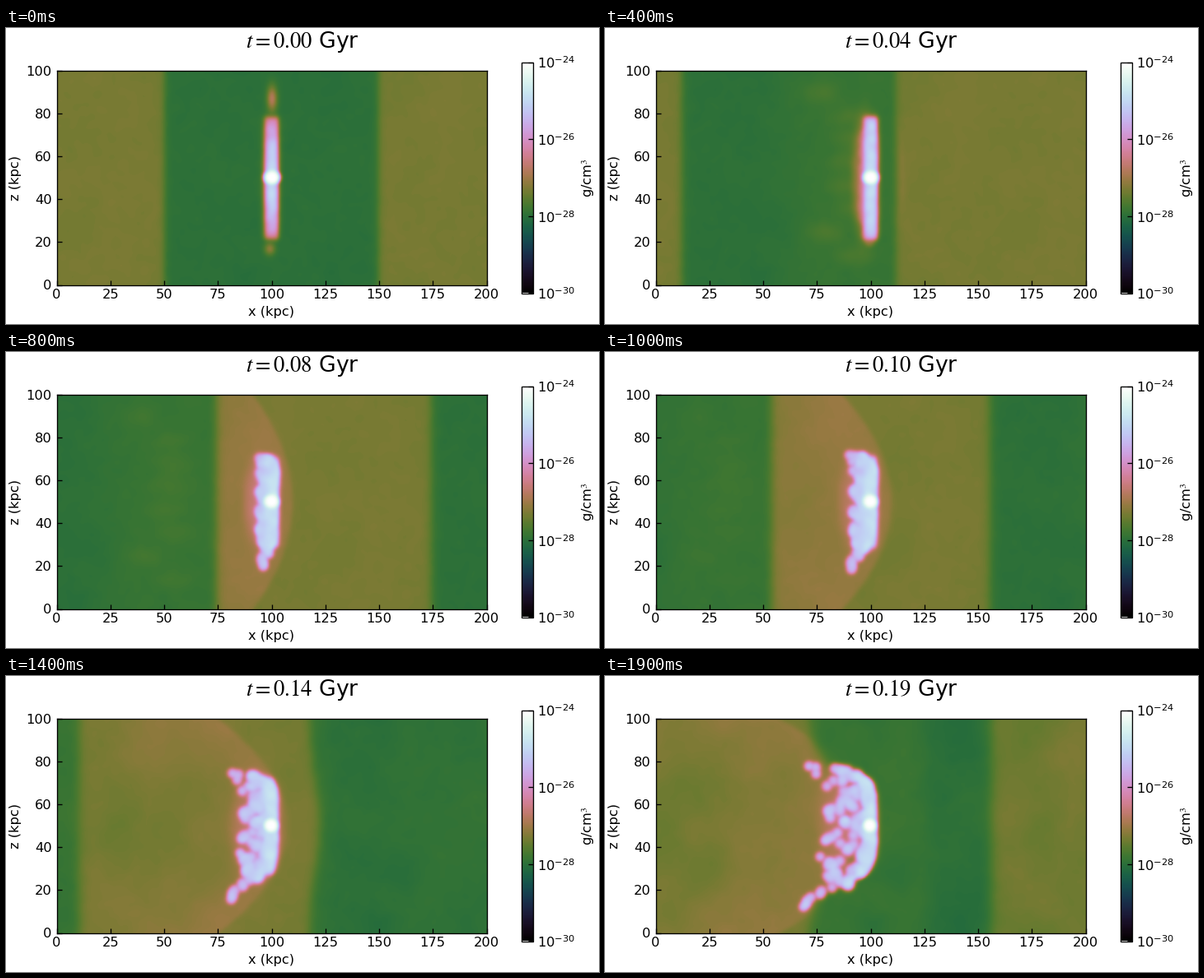
Animation, 720 px wide and 360 px high, one loop 2 s. Source, as a matplotlib script:

```python
import numpy as np
import matplotlib.pyplot as plt
from matplotlib.animation import FuncAnimation
from matplotlib.colors import LogNorm

plt.rcParams.update({
    "font.family": "DejaVu Sans",
    "font.size": 9.75,
    "mathtext.fontset": "stix",
    "xtick.direction": "in",
    "ytick.direction": "in",
    "xtick.major.pad": 2.6,
    "axes.labelpad": 3.5,
})

W, H, DPI = 720, 360, 120
FRAMES, INTERVAL = 20, 100
NX, NZ = 348, 174

xs = (np.arange(NX) + 0.5) * 200 / NX
zs = (np.arange(NZ) + 0.5) * 100 / NZ
X, Z = np.meshgrid(xs, zs)
DZ = Z - 50

rng = np.random.default_rng(11)


def smooth_noise(size):
    raw = rng.normal(size=(NZ, NX))
    kx = np.fft.fftfreq(NX, 200 / NX)
    kz = np.fft.fftfreq(NZ, 100 / NZ)[:, None]
    low = np.exp(-2 * (np.pi * size) ** 2 * (kx ** 2 + kz ** 2))
    out = np.fft.ifft2(np.fft.fft2(raw) * low).real
    return out / out.std()


FINE, COARSE = smooth_noise(1.6), smooth_noise(6)

# gas clumps of the disk: even rows in height, outer rows lose more gas
ROWS, TAIL = 90, 7
clump_dz = np.append(np.linspace(-20, 20.5, ROWS), np.linspace(-30, -21, TAIL))
clump_x = 99.5 + rng.uniform(-3, 1.5, ROWS + TAIL)
outer = np.minimum(np.abs(clump_dz) / 21, 1)
drag = rng.random(ROWS + TAIL) ** (2.4 - 1.3 * outer)
drag[ROWS:] = np.linspace(1, 0.6, TAIL)
clump_r = 2.3 - 0.5 * drag

# faint puffs left downstream of the disk
puff_z = np.linspace(14, 90, 8)
puff_x = 100 - rng.uniform(6, 24, 8)


def ramp(n, start, stop):
    return min(max((n - start) / (stop - start), 0), 1)


def step(d, width):
    return 0.5 * (1 + np.tanh(d / width))


def bump(x, z, rx, rz, power=1):
    return np.exp(-(((X - x) / rx) ** 2 + ((Z - z) / rz) ** 2) ** power)


def lift(v, peak, mask):
    return v + np.maximum(peak - v, 0) * mask


def wind(n):
    """Periodic dense and thin gas, with the bow shock around the disk."""
    late = ramp(n, 8, 19)
    start = 50 - 9.47 * n
    end = 149.5 - 9.5 * n - 1.3 * max(n - 9, 0)
    width = 2 + 0.07 * n

    # thin gas, greener where it has passed the disk
    bulge = 30 * late ** 3 * np.exp(-(DZ / 27) ** 2)
    thin = (step(X - start, width) * step(end - X, width)
            + step(X - start - 200 - bulge, width) * step(end + 200 - X, width))
    first = step(X - end + 50, 12) * step(end - X, 5) + step(X - end - 150, 12)
    second = step(126 - X, 4)
    turn = ramp(n, 12, 16)
    swept = ramp(n, 0, 4) * ((1 - turn) * first + turn * second)
    low = 0.336 + 0.022 * swept

    # dense gas, browner between its front and the bow shock
    nose = 109.5 + 1.5 * max(8 - n, 0) - 1.2 * max(n - 12, 0)
    bow = nose - 2.3 * n * (DZ / 50) ** 2
    decay = 40 + 1000 * np.exp(-n / 3.5)
    shock = step(bow - X, 1.3 + late) * step(X - end - 1, 3)
    shock *= np.exp(-np.maximum(bow - X, 0) / decay)
    shock *= np.exp(-(DZ / (20 + 0.4 * n ** 2.4)) ** 4)
    shock *= 1 - 0.25 * late * (1 - (DZ / 50) ** 2)
    high = 0.447 + 0.043 * ramp(n, 0, 6) * shock
    high -= 0.024 * ramp(n, 9, 15) * bump(end + 30, 52, 40, 26)
    high -= 0.008 * late * step(X - 150, 5)

    shift = -int(round(9.8 * n * NX / 200))
    v = high + (low - high) * thin
    v += 0.0015 * np.roll(FINE, shift, 1)
    v += (0.002 + 0.004 * late) * np.roll(COARSE, shift, 1)

    fade = 0.03 * ramp(n, 0, 3) * (1 - ramp(n, 5, 12))
    for px, pz in zip(puff_x, puff_z):
        v += fade * thin * bump(100 + (px - 100) * ramp(n, 0, 4)
                                - 9.5 * max(n - 4, 0), pz, 9, 5)
    return v


def bend(dz, n):
    """How far the wind has pushed the disk back at a given height."""
    return 7 * ramp(n, 8, 19) * np.minimum(np.abs(dz) / 25, 1.1) ** 4


def clumps(n):
    """Blurred sum of the gas clumps that drift off the disk."""
    age = max(n - 8, 0)
    x = clump_x - 1.75 * drag * max(n - 6, 0) - bend(clump_dz * 1.19, n)
    z = 50 + clump_dz + 0.7 * age * outer * np.sign(clump_dz)
    x[ROWS:] += 0.2 * age
    total = np.zeros_like(X)
    for cx, cz, r in zip(x, z, clump_r):
        total += bump(cx, cz, r, r)
    return ramp(n, 3, 8) * (1 - np.exp(-1.6 * total))


def density(n):
    v = wind(n)

    # loose ends blown away early
    ends = 1 - ramp(n, 0, 3.5)
    v = lift(v, 0.53, ends * bump(100 - 2.5 * n, 87, 2.4, 6))
    v = lift(v, 0.47, ends * bump(99 - 2.5 * n, 17, 2.6, 3))

    # stripped halo on the downstream side
    half = 28.5 - 8 * ramp(n, 4, 8) + 4 * ramp(n, 8, 19)
    halo = 0.11 * ramp(n, 0, 4) - 0.05 * ramp(n, 4, 10)
    v = v + halo * bump(97 - 0.7 * max(n - 4, 0), 50, 4.5 + 0.35 * n, half, 2)

    right = 102.9 - bend(DZ, n)
    core = step(X - right + 6.3, 1.5) * step(right - X, 1.3)
    core = core * step(half - np.abs(DZ), 1.6)
    gas = 1 - (1 - core) * (1 - clumps(n))
    crest = 0.855 - 0.17 * np.exp(-n / 3) * (DZ / 27) ** 2
    crest = crest - 0.05 * step(right - 6 - X, 2) + 0.01 * np.roll(FINE, -2 * n, 1)
    v = lift(v, crest, gas)

    return lift(v, 1, bump(100 - 0.03 * n, 50.3, 3.9 - 0.04 * n, 3.2, 2))


def box(x0, y0, x1, y1):
    return [x0 / W, 1 - y1 / H, (x1 - x0) / W, (y1 - y0) / H]


def to_cgs(v):
    return 10 ** (-30 + 6 * np.clip(v, 0, 1))


fig = plt.figure(figsize=(W / DPI, H / DPI), dpi=DPI, facecolor="white")
ax = fig.add_axes(box(61.5, 51.5, 583.5, 312.5))
cax = fig.add_axes(box(625.5, 41.5, 639.5, 322.5))

image = ax.imshow(to_cgs(density(0)), origin="lower", extent=(0, 200, 0, 100),
                  cmap="cubehelix", norm=LogNorm(1e-30, 1e-24),
                  interpolation="bilinear", aspect="auto")
ax.set_xticks(range(0, 201, 25))
ax.set_yticks(range(0, 101, 20))
ax.set_xlabel("x (kpc)")
ax.set_ylabel("z (kpc)")

bar = fig.colorbar(image, cax=cax, ticks=[1e-30, 1e-28, 1e-26, 1e-24])
bar.minorticks_off()
bar.set_label("g/cm$^3$")

title = fig.text(0.5, 1 - 24 / H, "", fontsize=16, ha="center", va="baseline")


def update(n):
    image.set_data(to_cgs(density(n)))
    title.set_text(f"$t={n / 100:.2f}$ Gyr")
    return image, title


anim = FuncAnimation(fig, update, frames=FRAMES, interval=INTERVAL,
                     repeat=True, repeat_delay=0)
plt.show()
```
